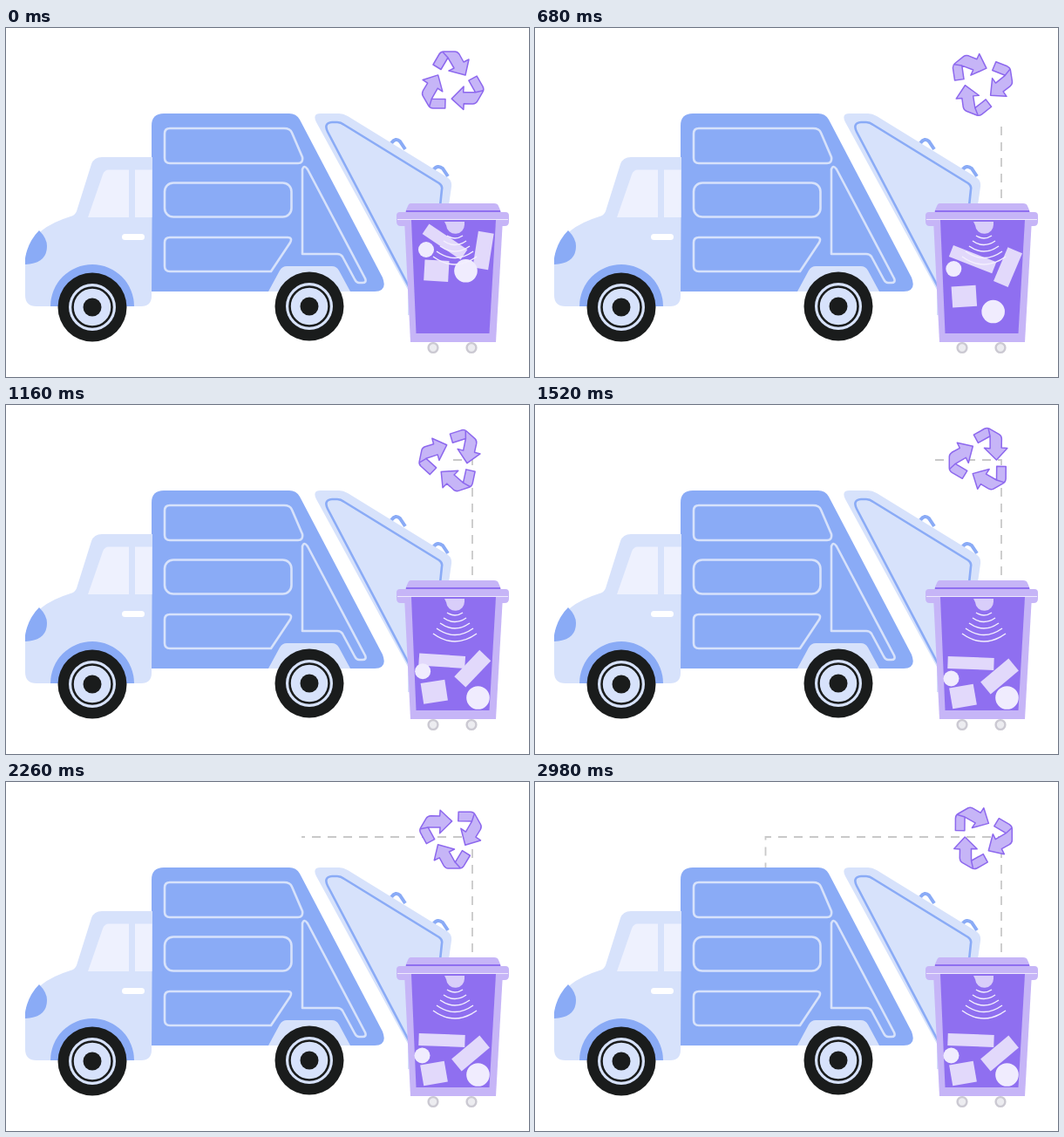
These frames come from a looping animation (600 px wide and 400 px high, 3 s). An HTML page:

```html
<!DOCTYPE html>
<html>
<head>
<meta charset="utf-8">
<style>
  html, body { margin: 0; width: 100%; height: 100%; overflow: hidden; background: #fff; }
  svg { display: block; width: 600px; height: 400px; }
  .blue { fill: #8aabf6; }
  .pale { fill: #d7e2fb; }
  .glass { fill: #eef1fe; }
  .dark { fill: #1a1c1c; }
  .lilac { fill: #c6b5f7; }
  .trash { fill: #e2d9fb; }
  .ball { fill: #f0ecfe; }
  .line { fill: none; stroke-width: 2.6; stroke-linejoin: round; }
</style>
</head>
<body>
<svg viewBox="0 0 600 400">
  <defs>
    <g id="wheel">
      <circle class="dark" r="39.5"/>
      <circle class="pale" r="27"/>
      <circle r="22.5" fill="none" stroke="#1a1c1c" stroke-width="2.6"/>
      <circle class="dark" r="10.5"/>
    </g>
    <g id="arrow" transform="translate(-511.3 -63)">
      <path d="M490 42L497 30Q499 27 502 27H515Q518 27 520 30L525 39L531 36L527 54L508 49L514 46L507 34L499 47.500Z"/>
      <path d="M501 27.500L507 34" fill="none"/>
    </g>
    <g id="caster">
      <circle r="5.400" fill="#ececf0" stroke="#cbc9d2" stroke-width="2.400"/>
    </g>
  </defs>

  <path id="route" d="M535 213V63H264.500V105" fill="none" stroke="#c9c9c9" stroke-width="1.800"/>

  <!-- hopper -->
  <g fill="none" stroke="#8aabf6" stroke-width="4">
    <path d="M442 132Q447 125 452 130L458 139"/>
    <path d="M490 163Q495 156 501 161L507 170"/>
  </g>
  <path class="pale" d="M361 98H382Q387 98 392 101L506 171Q512 175 511 182L490 329H461V300L356 108Q351 98 361 98Z"/>
  <path class="line" stroke="#8aabf6" d="M463 298L369 119Q364 109 374 108H380Q384 108 388 111L497 178Q501 181 500 185L492 262"/>

  <!-- truck -->
  <path class="blue" d="M181 98H325Q333 98 337 105L432 286Q438 302 423 302H167V112Q167 98 181 98Z"/>
  <path class="pale" d="M301 302L314 278Q317 273 322 273H374Q379 273 382 278L395 302Z"/>
  <g class="line" stroke="#d7e2fb">
    <path d="M188 115H319Q326 115 328 120L340 148Q341 155 335 155H188Q182 155 182 149V121Q182 115 188 115Z"/>
    <rect x="182" y="177.500" width="145.500" height="39" rx="10"/>
    <path d="M188 240H323Q329 240 326 246L304 279H188Q182 279 182 273V246Q182 240 188 240Z"/>
    <path d="M340 162Q342 156 346 162L412 287Q414 292 409 292H405Q402 292 400 288L386 262Q384 259 380 259H340Z"/>
  </g>
  <path class="pale" d="M168 148H110Q101 148 98 156L81 210Q79 215 74 216Q22 232 22 270V306Q22 319 35 319H155Q167 319 167 307Z"/>
  <path class="blue" d="M38 232Q47 241 47 250Q47 270 22 271V264Q25 245 38 232Z"/>
  <path class="glass" d="M118 162.500H141V217H94L111 168Q113 162.500 118 162.500ZM148 162.500H167.500V217H148Z"/>
  <rect x="133" y="236" width="26" height="7" rx="3.500" fill="#fff"/>
  <path class="blue" d="M51 319A48 48 0 0 1 147 319Z"/>
  <use href="#wheel" x="99" y="320"/>
  <use href="#wheel" x="348" y="319"/>

  <!-- bin -->
  <use href="#caster" x="490" y="366.500"/>
  <use href="#caster" x="534" y="366.500"/>
  <path class="lilac" d="M457 219H570L562 360H464Z"/>
  <path d="M465 220H562L554.500 350H470.500Z" fill="#8f6ff0"/>
  <path class="lilac" d="M464 201H560Q564 201 565 204L568 211H458L461 204Q462 201 464 201Z"/>
  <path class="lilac" d="M452 211H573Q577 211 577 215V222Q577 227 572 227H563V220H462V227H453Q448 227 448 222V215Q448 211 452 211Z"/>
  <path d="M459 210H567" stroke="#8f6ff0" stroke-width="2"/>
  <path d="M449 219.500H576" stroke="#eee9fd" stroke-width="1.200"/>
  <path d="M503 222H526V224.500A10.500 10.500 0 0 1 505 226Z" fill="#d9cefa"/>

  <rect id="plank" class="trash" x="-26.500" y="-7" width="53" height="14"/>
  <circle id="pebble" class="ball" r="9"/>
  <rect id="block" class="trash" x="-14" y="-12" width="28" height="24"/>
  <rect id="bar" class="trash" x="-9" y="-21" width="18" height="42"/>
  <circle id="ball" class="ball" r="13.300"/>
  <path id="waves" fill="none" stroke="#f4f0fe" stroke-width="1.500"/>

  <g id="recycle" fill="#c6b5f7" stroke="#8d68ee" stroke-width="1.500" stroke-linejoin="round">
    <use href="#arrow"/>
    <use href="#arrow" transform="rotate(120)"/>
    <use href="#arrow" transform="rotate(240)"/>
  </g>
</svg>
<script>
const $ = id => document.getElementById(id);
const LOOP = 3000, DASH = 10, GAP = 8, SPEED = 0.153;

let waves = "";
for (let i = 0; i < 5; i++) {
  const w = 9 + 4 * i, y = 238 + 6 * i;
  waves += `M${515 - w} ${y}Q515 ${y + 6 + 3 * i} ${515 + w} ${y}`;
}
$("waves").setAttribute("d", waves);

// Smooth 0..1 progress between two times
function ease(t, start, end) {
  const x = Math.min(1, Math.max(0, (t - start) / (end - start)));
  return x * x * (3 - 2 * x);
}

function place(id, x, y, angle = 0) {
  $(id).setAttribute("transform", `translate(${x} ${y}) rotate(${angle})`);
}

// from and to are [x, y, angle]
function fall(id, t, start, end, from, to) {
  const k = ease(t, start, end);
  place(id, ...from.map((v, i) => v + (to[i] - v) * k));
}

// Dash list that shows only the first part of the route
function dashes(length) {
  const list = [];
  for (let s = 0; s < length; s += DASH + GAP) list.push(Math.min(DASH, length - s), GAP);
  if (!list.length) list.push(0);
  list[list.length - (list.length > 1 ? 1 : 0)] = 2000;
  return list.length > 1 ? list.join(" ") : "0 2000";
}

function draw(t) {
  $("route").setAttribute("stroke-dasharray", dashes(t * SPEED));
  place("recycle", 511.3, 63, -90 * ease(t, 0, 1500) + 60 * ease(t, 1500, 3000));
  fall("plank", t, 200, 1320, [503.5, 245, 34], [500, 296, 2]);
  fall("pebble", t, 120, 1480, [482, 254, 0], [477.5, 313.5, 0]);
  fall("block", t, -240, 1480, [494, 275, 4], [491, 334, -10]);
  fall("bar", t, 150, 1500, [547.5, 255, 9], [533, 311, 50]);
  place("ball",
    527.5 - 4.5 * ease(t, 0, 340) + 18.5 * ease(t, 550, 1100),
    278 + 57.5 * ease(t, -40, 950));
}

function tick() {
  draw(performance.now() % LOOP);
  requestAnimationFrame(tick);
}
tick();
</script>
</body>
</html>
```
